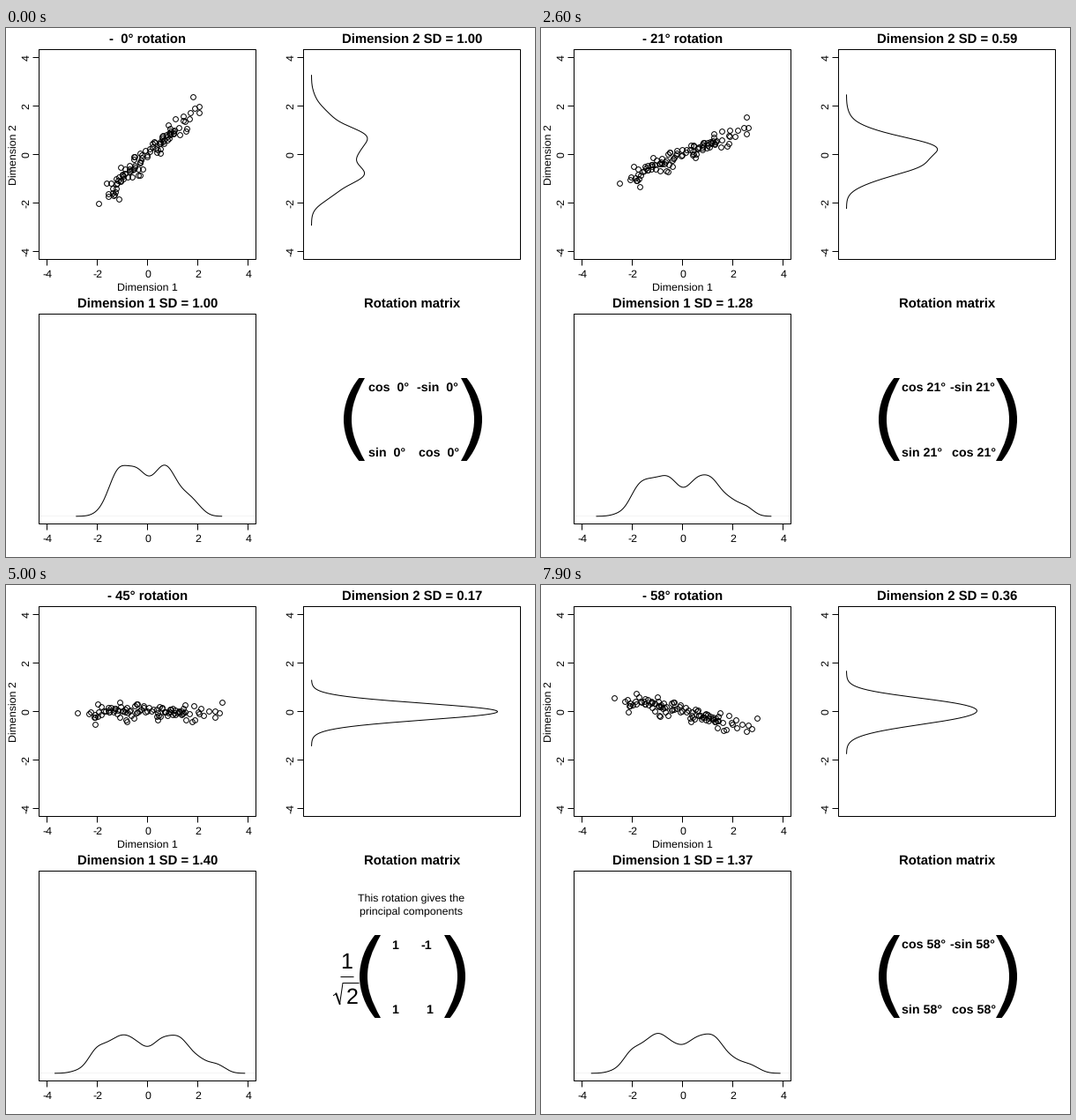
Write a matplotlib script that moves like this. It is 600 by 600 pixels and loops after 8000 ms.

```python
import numpy as np
import matplotlib.pyplot as plt
from matplotlib.animation import FuncAnimation
from matplotlib.patches import PathPatch
from matplotlib.path import Path

plt.rcParams["text.hinting"] = "none"

SIZE, DPI = 600, 100
PX = 72 / DPI                               # one pixel in points
TEXT, TITLE, CELL = 12.45, 14.94, 14.3

# Panel geometry in pixels; every panel spans -4..4 plus 4% on each side
HALF = SIZE / 2
LEFT, RIGHT, TOP, BOTTOM = 37.35, 283.8, 24.9, 262.65
X0, Y0 = (LEFT + RIGHT) / 2, (TOP + BOTTOM) / 2
SX, SY = (RIGHT - LEFT) / 8.64, (BOTTOM - TOP) / 8.64
PAD = 0.04 / 1.08
TICKS = range(-4, 5, 2)

BANDWIDTH, TOP_DENSITY = 0.3, 1.25
CORR = 0.9697                               # between the unrotated dimensions

# Bulk of the sample along the main axis: centre, half width, count
CLUSTERS = [(-1.98, 0.35, 12), (-1.0, 0.6, 26), (0.0, 0.43, 13),
            (0.95, 0.57, 28), (1.8, 0.4, 7)]
# Points standing out from the bulk: along and across the main axis
OUTLIERS = [(-2.81, -0.05), (-2.12, -0.48), (-1.99, 0.32), (-1.14, 0.36),
            (-0.88, -0.33), (-0.84, -0.37), (1.76, -0.37), (1.87, -0.31),
            (2.13, 0.15), (2.43, 0.05), (2.67, 0.04), (2.67, -0.21),
            (2.85, -0.03), (2.97, 0.39)]


def make_sample():
    """Return u and v, uncorrelated, with the spread implied by CORR."""
    rng = np.random.default_rng(4)
    u = np.concatenate([np.linspace(c - h, c + h, n) for c, h, n in CLUSTERS])
    u += rng.normal(0, 0.03, u.size)
    v = rng.normal(0, 0.15, u.size).clip(-0.3, 0.3)
    u, v = np.vstack([np.column_stack([u, v]), OUTLIERS]).T
    u, v = u - u.mean(), v - v.mean()
    v -= u * (u @ v) / (u @ u)
    return (u * np.sqrt(1 + CORR) / u.std(ddof=1),
            v * np.sqrt(1 - CORR) / v.std(ddof=1))


def density(values):
    pad = 3 * BANDWIDTH
    grid = np.linspace(values.min() - pad, values.max() + pad, 300)
    z = (grid[:, None] - values) / BANDWIDTH
    return grid, np.exp(-z**2 / 2).mean(axis=1) / (BANDWIDTH * np.sqrt(2 * np.pi))


fig = plt.figure(figsize=(SIZE / DPI, SIZE / DPI), dpi=DPI, facecolor="white")
ax = fig.add_axes([0, 0, 1, 1])
ax.set(xlim=(0, SIZE), ylim=(SIZE, 0))
ax.axis("off")


def line(xs, ys, width=1, color="black", **kw):
    return ax.plot(xs, ys, color=color, lw=width * PX, **kw)[0]


def crisp(xs, ys, **kw):
    """Straight line filling whole pixels; snapping adds the half pixel."""
    return line(np.floor(xs), np.floor(ys), solid_joinstyle="miter",
                solid_capstyle="butt", **kw)


def label(x, y, text="", size=TEXT, bold=False, **kw):
    return ax.text(x, y, text, fontsize=size * PX, family="Liberation Sans",
                   weight="bold" if bold else "normal",
                   ha="center", va="baseline", **kw)


def side_label(x, y, text):
    label(x, y, text, rotation=90, rotation_mode="anchor")


def box(dx, dy):
    l, r, t, b = LEFT + dx, RIGHT + dx, TOP + dy, BOTTOM + dy
    crisp([l, r, r, l, l], [t, t, b, b, t])


def x_axis(dy):
    y = BOTTOM + dy
    for t in TICKS:
        x = X0 + t * SX
        crisp([x, x], [y, y + 7])
        label(x, y + 20.5, str(t))


def y_axis(dx):
    x = LEFT + dx
    for t in TICKS:
        y = Y0 - t * SY
        crisp([x - 7, x], [y, y])
        side_label(x - 11, y, str(t))


def paren(tip, direction):
    """Big bracket; direction is 1 for the left one, -1 for the right one."""
    outer = [(6.6, 397), (18, 411), (24, 428), (24, 444)]
    inner = [(15, 444), (15, 429), (10.5, 416), (0, 397)]

    def mirror(pts):
        return [(d, 888 - y) for d, y in reversed(pts)]

    pts = outer + mirror(outer)[1:] + mirror(inner) + inner[1:]
    verts = [(tip - direction * d, y) for d, y in pts] + [(tip, 397)]
    half = [Path.CURVE4] * 6
    codes = [Path.MOVETO, *half, Path.LINETO, *half, Path.CLOSEPOLY]
    return ax.add_patch(PathPatch(Path(verts, codes), fc="black", lw=0))


# Static panels
for corner in [(0, 0), (HALF, 0), (0, HALF)]:
    box(*corner)
x_axis(0)
x_axis(HALF)
y_axis(0)
y_axis(HALF)
base1 = BOTTOM + HALF - PAD * (BOTTOM - TOP)
base2 = LEFT + HALF + PAD * (RIGHT - LEFT)
crisp([LEFT + 1, RIGHT], [base1, base1], color="#f3f3f3", zorder=1)
label(X0, 298, "Dimension 1")
side_label(12, Y0, "Dimension 2")
label(X0 + HALF, 318, "Rotation matrix", TITLE, True)

# Moving parts
title = label(X0, 18, size=TITLE, bold=True)
title1 = label(X0, 318, size=TITLE, bold=True)
title2 = label(X0 + HALF, 18, size=TITLE, bold=True)
dots = ax.plot([], [], "o", ms=5.8 * PX, mfc="none", mec="black", mew=PX,
               snap=False)[0]
curve1 = line([], [])
curve2 = line([], [])

# Matrix of cosines and sines
cells = [(label(x, y, size=CELL, bold=True), name) for x, y, name in
         [(434, 412, "cos"), (489, 412, "-sin"),
          (432, 486, "sin"), (491, 486, "cos")]]
trig = [cell for cell, _ in cells] + [paren(407, 1), paren(516, -1)]

# Matrix at the principal components
principal = [
    label(460, 360, "This rotation gives the"),
    label(460, 375, "principal components"),
    label(441, 413, "1", CELL, True), label(477, 413, "-1", CELL, True),
    label(441, 486, "1", CELL, True), label(480, 486, "1", CELL, True),
    label(386.5, 435, "1", 25), label(392.5, 475, "2", 25),
    crisp([379, 394], [444, 444]),
    line([371.5, 374.5], [465.5, 463.5]),
    line([374.5, 378.5], [463.5, 475], 1.8),
    line([378.5, 382, 400], [475.5, 451.5, 451.5]),
    paren(425, 1), paren(497, -1),
]

U, V = make_sample()


def angle_at(frame):
    """Degrees: a rest at 0, one per frame, and a long rest at 45."""
    if frame <= 50:
        return max(0, frame - 5)
    return max(45, frame - 21)


def draw(frame):
    deg = angle_at(frame)
    turn = np.radians(45 - deg)
    x = U * np.cos(turn) - V * np.sin(turn)
    y = U * np.sin(turn) + V * np.cos(turn)
    dots.set_data(X0 + x * SX, Y0 - y * SY)

    grid, d = density(x)
    height = (BOTTOM - TOP) / 1.08 / TOP_DENSITY
    curve1.set_data(X0 + grid * SX, base1 - d * height)
    grid, d = density(y)
    width = (RIGHT - LEFT) / 1.08 / TOP_DENSITY
    curve2.set_data(base2 + d * width, Y0 - grid * SY)

    title.set_text(f"- {deg:2d}° rotation")
    title1.set_text(f"Dimension 1 SD = {x.std(ddof=1):.2f}")
    title2.set_text(f"Dimension 2 SD = {y.std(ddof=1):.2f}")
    for cell, name in cells:
        cell.set_text(f"{name} {deg:2d}°")
    for part in trig:
        part.set_visible(deg != 45)
    for part in principal:
        part.set_visible(deg == 45)
    return []


anim = FuncAnimation(fig, draw, frames=80, interval=100, repeat=True,
                     repeat_delay=0, blit=False)
plt.show()
```
